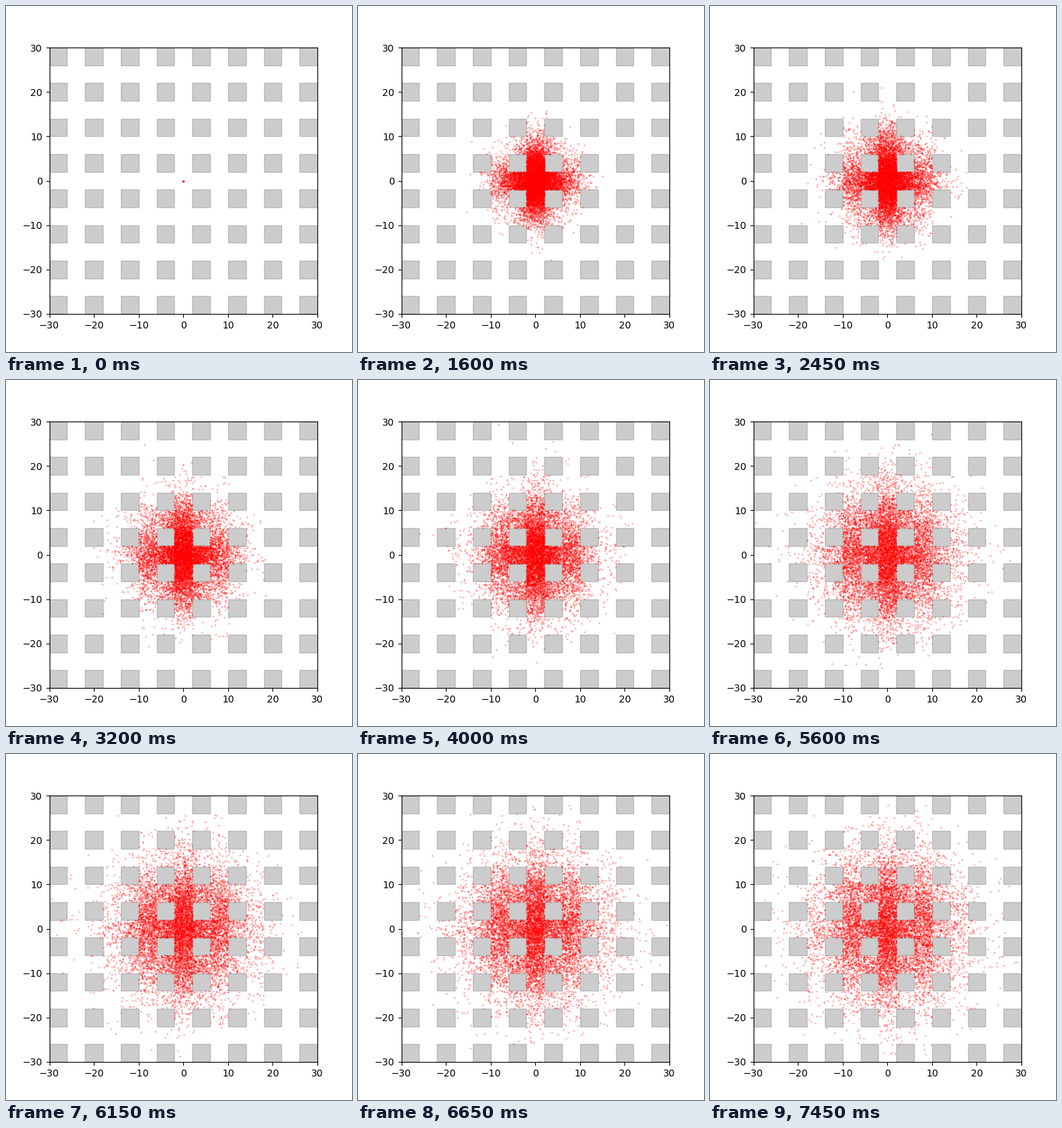
A matplotlib script for the animation above (7500 ms loop, 500x500 px).

```python
import numpy as np
import matplotlib.pyplot as plt
from matplotlib.animation import FuncAnimation
from matplotlib.patches import Rectangle

FRAMES, INTERVAL = 150, 50
WALKERS = 10000
STEP = 0.8           # standard deviation of one step per axis
PITCH, SIDE = 8, 4   # block spacing and block size
LIMIT = 30
CROSS_STREET = 0.75  # relative density between vertically stacked blocks


def weight(p):
    """Relative density at p: zero inside a block."""
    in_col, in_row = (np.abs(p % PITCH - PITCH / 2) < SIDE / 2).T
    return np.where(in_col, np.where(in_row, 0.0, CROSS_STREET), 1.0)


def walk(seed=4):
    """Random walk from the centre that never enters a block."""
    rng = np.random.default_rng(seed)
    pos = np.zeros((WALKERS, 2))
    path = [pos]
    for _ in range(FRAMES - 1):
        trial = pos + rng.normal(0, STEP, pos.shape)
        accept = rng.random(WALKERS) * weight(pos) < weight(trial)
        pos = np.where(accept[:, None], trial, pos)
        path.append(pos)
    return path


path = walk()

fig, ax = plt.subplots(figsize=(5, 5), dpi=100)
ax.set_xlim(-LIMIT, LIMIT)
ax.set_ylim(-LIMIT, LIMIT)
ax.set_xticks(range(-LIMIT, LIMIT + 1, 10))
ax.set_yticks(range(-LIMIT, LIMIT + 1, 10))

for x in range(-LIMIT, LIMIT, PITCH):
    for y in range(-LIMIT, LIMIT, PITCH):
        ax.add_patch(Rectangle((x, y), SIDE, SIDE, color="gray", alpha=0.4))

dots, = ax.plot(*path[0].T, "r.", markersize=0.5)


def update(i):
    dots.set_data(*path[i].T)
    return dots,


anim = FuncAnimation(fig, update, frames=FRAMES, interval=INTERVAL,
                     repeat=True, repeat_delay=0)
plt.show()
```
